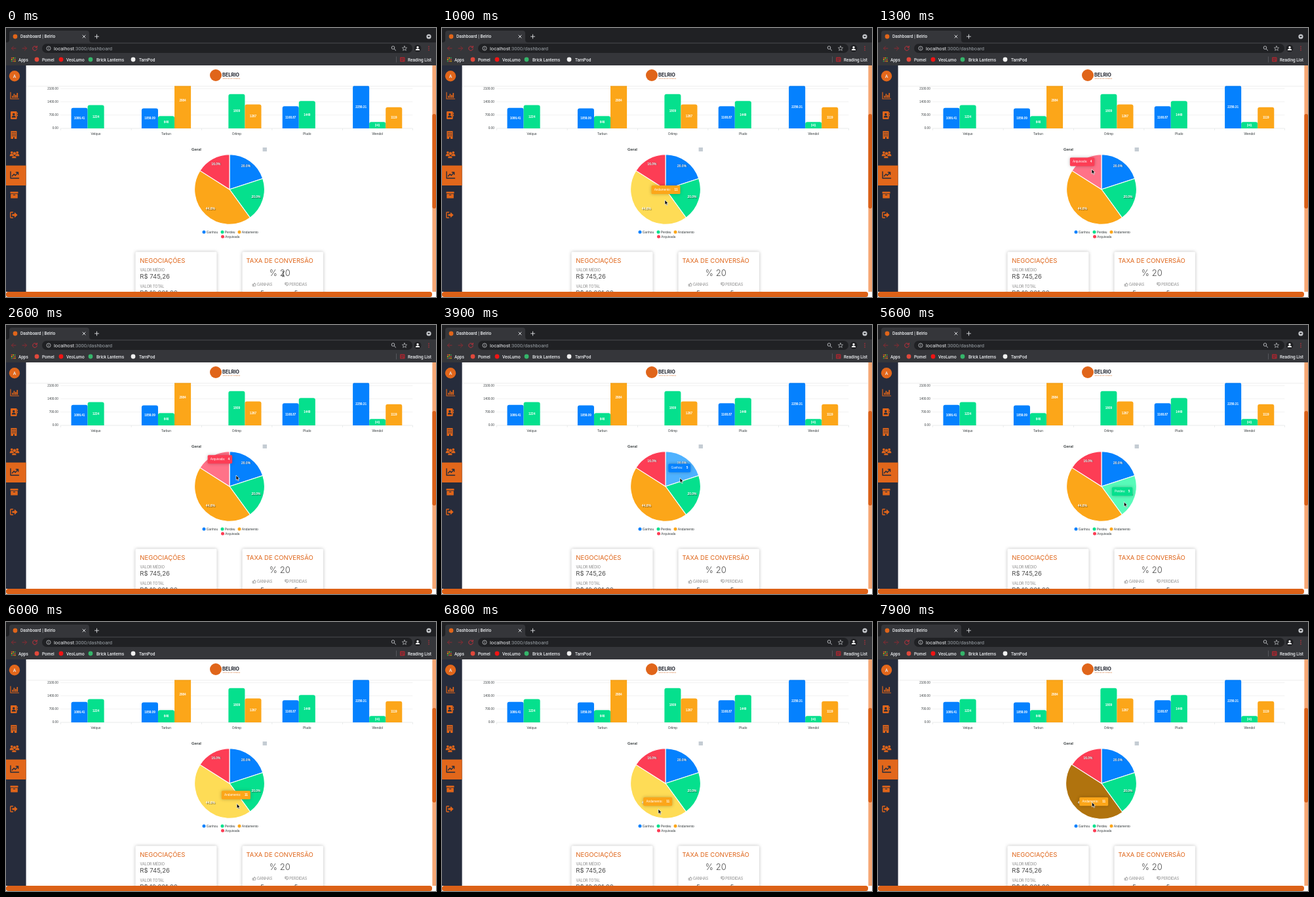
An HTML page for the animation above (8000 ms loop, 656 by 410 pixels).

```html
<!DOCTYPE html>
<html lang="pt-BR">
<head>
<meta charset="utf-8">
<title>Dashboard | Belrio</title>
<style>
  html, body { margin: 0; width: 100%; height: 100%; overflow: hidden; background: #fff; }
  svg { display: block; }
  text { white-space: pre; }
  .ui { font: 500 6.5px Roboto, sans-serif; fill: #e8eaed; }
  .chart { font: 4.9px "Liberation Sans", Arial, sans-serif; fill: #373d3f; }
  .value { font-size: 4.6px; font-weight: bold; fill: #fff; }
  .share { font-size: 4.95px; font-weight: bold; fill: #fff; text-shadow: .7px .7px .8px rgba(0,0,0,.55); }
  .card { font-family: Inter, sans-serif; fill: #4c4c4c; }
  .head { font-size: 9.5px; fill: #df6418; }
  .note { font-size: 5.5px; fill: #858585; }
  .num { font-size: 9.5px; }
  .soft { filter: drop-shadow(0 0 2.4px rgba(0,0,0,.26)); }
</style>
</head>
<body>
<svg id="stage" width="656" height="410" viewBox="0 0 656 410"></svg>
<script>
const ORANGE = '#e0651a', NAVY = '#262c3c';
const LOOP = 8000, STEP = 100;
const TOP = 57;
const PIE = { x: 341, y: 246, r: 53.4 };
const slices = [
  { name: 'Ganhou', n: 5, color: '#0581fe', light: '#4fb2ff', tip: 34 },
  { name: 'Perdeu', n: 5, color: '#05e08d', light: '#58fbb9', tip: 31.5 },
  { name: 'Andamento', n: 11, color: '#fca619', light: '#fedc56', tip: 44 },
  { name: 'Arquivada', n: 4, color: '#fd3d55', light: '#ff7288', tip: 37.5 }
];
let turn = 0;
for (const s of slices) { s.from = turn; turn += s.n / 25; s.to = turn; }

// Markup helpers
const rect = (x, y, w, h, fill, rx = 0, more = '') =>
  `<rect x="${x}" y="${y}" width="${w}" height="${h}" rx="${rx}" fill="${fill}" ${more}/>`;
const dot = (x, y, r, fill, more = '') => `<circle cx="${x}" cy="${y}" r="${r}" fill="${fill}" ${more}/>`;
const text = (x, y, str, cls, more = '') => `<text x="${x}" y="${y}" class="${cls}" ${more}>${str}</text>`;
const line = (d, color, w = 1) =>
  `<path d="${d}" fill="none" stroke="${color}" stroke-width="${w}" stroke-linecap="round" stroke-linejoin="round"/>`;
const shape = (d, fill) => `<path d="${d}" fill="${fill}"/>`;
const at = (x, y, body) => `<g transform="translate(${x} ${y})">${body}</g>`;
const MID = 'text-anchor="middle"', END = 'text-anchor="end"';

function polar(turns, r) {
  const a = turns * 2 * Math.PI;
  return [PIE.x + r * Math.sin(a), PIE.y - r * Math.cos(a)];
}
function wedge(s, r) {
  const big = s.to - s.from > .5 ? 1 : 0;
  return `M${PIE.x} ${PIE.y}L${polar(s.from, r)}A${r} ${r} 0 ${big} 1 ${polar(s.to, r)}Z`;
}

function browser() {
  const bar = '#35363a', grey = '#c4c7cb', red = '#c5303a';
  const marks = [[47, 55, 'Pomel', '#e0483b'], [84, 92, 'VeoLumo', '#f01414'],
    [129, 138, 'Brick Lanterns', '#35b56a'], [194, 203, 'TarnPod', '#f2f2f2']];
  let out = rect(0, 0, 656, TOP, '#202124') + rect(0, 22, 656, TOP - 22, bar) +
    `<path d="M1 22q4 0 4-4V8q0-4 4-4h114q4 0 4 4v10q0 4 4 4z" fill="${bar}"/>` +
    dot(14, 13, 3.4, ORANGE) + text(22, 15.2, 'Dashboard | Belrio', 'ui') +
    line('M117 11l4 4m0-4l-4 4', '#e8eaed', .9) + line('M135.5 13h6m-3-3v6', '#dfe1e5', .9) +
    dot(645, 13, 3.6, grey) + shape('M643 12h4l-2 2.6z', '#202124') +
    line('M15 31H8.5m3-3l-3 3l3 3', '#8b2a32') + line('M25 31h6.5m-3-3l3 3l-3 3', '#8b2a32') +
    line('M46.6 29a3.3 3.3 0 1 0 .7 2.6M47.3 27.5v2.2h-2.2', red) +
    rect(55, 24, 565, 14, '#202124', 7) +
    dot(65, 31, 3.1, 'none', `stroke="${grey}" stroke-width=".8"`) + line('M65 30.8v1.6M65 29.3v.1', grey, .8) +
    text(73, 33.5, 'localhost<tspan fill="#9aa0a6">:3000/dashboard</tspan>', 'ui', 'style="font-size:7.6px;font-weight:400"') +
    dot(590.5, 30, 2.3, 'none', `stroke="${grey}" stroke-width=".9"`) + line('M592.4 32l2.2 2.2', grey) +
    line('M608 27.5l1 2.4l2.6.2l-2 1.7l.7 2.5l-2.3-1.4l-2.3 1.4l.7-2.5l-2-1.7l2.6-.2z', grey, .7) +
    dot(628, 31, 5.5, '#202124') + dot(628, 29.4, 1.6, '#fff') + shape('M624.8 34q0-2.6 3.2-2.6t3.2 2.6z', '#fff');
  for (const dy of [-2.7, 0, 2.7]) out += dot(645, 31 + dy, .8, red);
  const hues = ['#e8453c', '#f5b400', '#35a853'];
  for (let i = 0; i < 9; i++)
    out += rect(7.8 + i % 3 * 2.5, 44.8 + (i / 3 | 0) * 2.5, 1.7, 1.7, hues[(i + (i / 3 | 0)) % 3], .4);
  out += text(19, 50.6, 'Apps', 'ui');
  marks.forEach(([ix, tx, label, color]) => out += dot(ix, 48, 3.4, color) + text(tx, 50.6, label, 'ui'));
  return out + rect(595, 43.5, .7, 9, '#63656a') +
    rect(601, 44.5, 7.5, 7, '#a8262f', 1) + line('M602.5 46.5h4.5m-4.5 1.6h4.5m-4.5 1.6h3', '#35363a', .7) +
    text(613, 50.6, 'Reading List', 'ui');
}

function sidebar() {
  const person = (x, y, k) => dot(x, y, 1.9 * k, ORANGE) +
    shape(`M${x - 3 * k} ${y + 5.4 * k}v-1q0-2.3 2-2.3h${2 * k}q2 0 2 2.3v1z`, ORANGE);
  let windows = '';
  for (let i = 0; i < 9; i++) windows += rect(-2.9 + i % 3 * 2.3, -4.3 + (i / 3 | 0) * 2.5, 1.2, 1.3, NAVY);
  return rect(0, TOP, 30.6, 402 - TOP, NAVY) + rect(0, 209.6, 30.6, 30.4, '#e2671b') +
    dot(13, 73.3, 8.2, '#e2671b') + text(13, 75.9, 'A', 'ui', MID + ' style="font-size:7px"') +
    at(13, 103, line('M-6-5V5H6.5', ORANGE, 1.2) +
      [[-3.8, 3], [-1.4, 6], [1, 4.4], [3.4, 7.4]].map(([x, h]) => rect(x, 3.4 - h, 1.7, h, ORANGE)).join('')) +
    at(12, 133, rect(-5, -6, 9.6, 12, ORANGE, 1.2) + rect(5, -4, 1, 2.2, ORANGE) + rect(5, -.8, 1, 2.2, ORANGE) +
      dot(-.2, -1.6, 1.7, NAVY) + shape('M-3.2 3.4q0-2.8 3-2.8t3 2.8z', NAVY)) +
    at(12, 163, rect(-4.6, -6, 9, 12, ORANGE, .6) + windows + rect(-1, 3.4, 2, 2.6, NAVY)) +
    at(13, 193, person(-4.2, -3.2, 1) + person(4.2, -3.2, 1) +
      `<g stroke="${NAVY}" stroke-width=".5">${person(0, -1.7, 1.35)}</g>`) +
    at(13, 224, line('M-6-5V5H6.5', NAVY, 1.4) + line('M-3.6 1.8L-.8-1.2L1.2.8L5-3.4M2.4-4H5.6V-.8', NAVY, 1.4)) +
    at(12.5, 254.5, rect(-6, -5, 12, 2.8, ORANGE, .5) + rect(-5.3, -1.5, 10.6, 6.5, ORANGE, .6) + rect(-1.7, -.4, 3.4, 1, NAVY, .4)) +
    at(12, 285, line('M-1.5-4.2H-4.3Q-5.2-4.2-5.2-3.3V3.3Q-5.2 4.2-4.3 4.2H-1.5', ORANGE, 1.4) +
      shape('M-2.6-1.5H1V-4.2L5.6 0L1 4.2V1.5H-2.6z', ORANGE));
}

function barChart() {
  const groups = [
    ['Velquo', 1086.41, 1234, 0], ['Tarbun', 1059.09, 646, 2984], ['Orlimp', 0, 1809, 1267],
    ['Pludo', 1168.87, 1449, 0], ['Wendol', 2259.31, 341, 1119]];
  const left = 83.4, base = 153, unit = 20.2 / 700, gap = 107.4, w = 25.06;
  let out = '';
  for (let i = 0; i < 4; i++) {
    const y = base - 20.2 * i;
    out += rect(left, y - .3, 537, .6, i ? '#e9e9e9' : '#d9dcde') +
      text(79.7, y + 1.1, (700 * i).toFixed(2), 'chart', END + ' style="font-size:4.57px"');
  }
  for (let i = 0; i < 6; i++) out += rect(left + gap * i, base, .6, 3, '#dcdfe1');
  groups.forEach(([name, ...values], g) => {
    const mid = left + gap * (g + .5);
    out += text(mid, 162.9, name, 'chart', MID);
    values.forEach((v, i) => {
      if (!v) return;
      const x = mid + (i - 1.5) * w, h = v * unit;
      out += shape(`M${x} ${base}v${3 - h}q0-3 3-3h${w - 6}q3 0 3 3V${base}z`, slices[i].color) +
        text(x + w / 2, base - h / 2 + 1.6, v, 'chart value', MID);
    });
  });
  return out;
}

function header() {
  return rect(30.6, TOP, 620, 88.3 - TOP, '#fff', 0, 'style="filter:drop-shadow(0 .8px 1.2px rgba(0,0,0,.16))"') +
    dot(320, 72, 9, ORANGE) +
    text(330, 74.2, 'BELRIO', 'card', 'style="font-size:7.3px;font-weight:700;fill:#20242e"') +
    text(330.5, 77.6, 'GESTOR DE VENDAS', 'card', 'style="font-size:2.7px;fill:#df8a55"');
}

function pie() {
  let out = text(283, 187, 'Geral', 'chart', 'style="font-size:5.8px;font-weight:bold"') +
    line('M392 183.1h5.6m-5.6 2h5.6m-5.6 2h5.6', '#6e8192', .8);
  slices.forEach((s, i) => out += `<path id="s${i}" stroke="#fff" stroke-width="1.1"/>`);
  for (const s of slices) {
    const [x, y] = polar((s.from + s.to) / 2, 42.6);
    out += text(x, y, (s.n * 4).toFixed(1) + '%', 'chart share', MID);
  }
  [[302, 311], [330, 311], [356, 311], [330.5, 318]].forEach(([x, y], i) =>
    out += dot(x, y, 2.5, slices[i].color) + text(x + 3.8, y + 1.8, slices[i].name, 'chart'));
  return out;
}

function cards() {
  const thumb = line('M-2.6-.3h1.4v3.2h-1.4zM-1.2 0L.3-2.8q1.1 0 .7 2h1.8l-.5 3.7h-3.5', '#777', .7);
  const box = (x, w) => rect(x, 341.2, w, 90, '#fff', 1.5, 'class="soft"');
  return box(197.5, 124) + box(360.5, 123.5) +
    text(204.3, 357.8, 'NEGOCIAÇÕES', 'card head') +
    text(204.5, 371, 'VALOR MÉDIO', 'card note') + text(204.3, 382.4, 'R$ 745,26', 'card num') +
    text(204.5, 396, 'VALOR TOTAL', 'card note') + text(204.3, 407, 'R$ 10.001,00', 'card num') +
    text(366.5, 357.8, 'TAXA DE CONVERSÃO', 'card head') +
    text(417.8, 378, '% 20', 'card', MID + ' style="font-size:13px;font-weight:300"') +
    at(378.7, 390.8, `<g transform="scale(.85)">${thumb}</g>`) + text(383, 393, 'GANHAS', 'card note') +
    at(428.3, 390.8, `<g transform="scale(.85 -.85)">${thumb}</g>`) + text(432.3, 393, 'PERDIDAS', 'card note') +
    text(391, 407, '5', 'card num', MID) + text(442.5, 407, '5', 'card num', MID);
}

function scrollbars() {
  return rect(650.4, TOP, 6, 410 - TOP, '#fff') + rect(650.4, TOP, 6, 402 - TOP, '#f6a774') +
    rect(650.4, 131, 5.6, 144, '#d95f17', 2.8) +
    rect(0, 402, 656, 8, '#fff') + rect(0, 402, 650, 8, '#dc6117', 3.5);
}

function overlay() {
  return `<g id="tip" class="soft"><rect id="tipBox" height="13" y="-13" rx="1.6"/>` +
    text(0, -5, '', 'chart', 'id="tipName" style="font-size:4.7px;fill:#fff"') +
    text(0, -5, '', 'chart', `id="tipNum" ${END} style="font-size:4.7px;font-weight:bold;fill:#fff"`) + '</g>' +
    `<path id="arrow" d="M0 0V7.4L1.7 5.9L2.9 8.6L4.1 8.1L2.9 5.4H5.1Z" fill="#000" stroke="#fff" stroke-width=".7"/>` +
    `<g id="beam">${line('M-1.6-4Q0-4 0-3V3Q0 4-1.6 4M1.6-4Q0-4 0-3M0 3Q0 4 1.6 4M-.9.9h1.8', '#333', .8)}</g>`;
}

const $ = id => document.getElementById(id);
$('stage').innerHTML = rect(0, 0, 656, 410, '#fff') + barChart() + header() + pie() + cards() +
  sidebar() + browser() + scrollbars() + overlay();

// Rows of time, x, y
const pointer = [
  [400, 423, 375], [1000, 340, 262], [1200, 311, 219], [1300, 326, 215], [1500, 327, 218],
  [2500, 327, 220], [2600, 351, 229], [3000, 363, 233], [3900, 363, 233], [4600, 375.3, 269.5],
  [5600, 375.3, 269.5], [6400, 329, 284], [6600, 330, 285], [7500, 330, 285], [7700, 326.3, 274.5]];
const tipPath = [
  [900, 352, 268], [1200, 311.6, 210.4], [1300, 311.6, 210.4], [1400, 326.4, 211.2], [2600, 326.4, 211.2],
  [2700, 350, 220], [3000, 362.3, 224.4], [3900, 362.3, 224.4], [4600, 372.6, 260.3], [5600, 372.6, 260.3],
  [6400, 329.2, 280.2]];

function follow(rows, t) {
  const next = rows.findIndex(r => r[0] > t);
  if (next < 1) return rows[next ? rows.length - 1 : 0].slice(1);
  const [t0, x0, y0] = rows[next - 1], [t1, x1, y1] = rows[next];
  const p = (t - t0) / (t1 - t0), k = p * p * (3 - 2 * p);
  return [x0 + (x1 - x0) * k, y0 + (y1 - y0) * k];
}

function sliceAt([x, y]) {
  const dx = x - PIE.x, dy = y - PIE.y;
  if (Math.hypot(dx, dy) > PIE.r) return -1;
  const a = (Math.atan2(dx, -dy) / (2 * Math.PI) + 1) % 1;
  return slices.findIndex(s => a < s.to);
}

function move(id, [x, y], shown) {
  $(id).setAttribute('transform', `translate(${x} ${y})`);
  $(id).setAttribute('visibility', shown ? 'visible' : 'hidden');
}

function draw(t) {
  const spot = follow(pointer, t);
  const hover = sliceAt(follow(pointer, t - STEP)); // the page reacts one step late
  const pressed = t >= 7700;
  slices.forEach((s, i) => {
    const on = i === hover;
    $('s' + i).setAttribute('d', wedge(s, PIE.r + (on && pressed ? 1 : 0)));
    $('s' + i).setAttribute('fill', on ? (pressed ? '#b0730e' : s.light) : s.color);
  });
  if (hover >= 0) {
    const s = slices[hover], half = s.tip / 2;
    $('tipBox').setAttribute('x', -half);
    $('tipBox').setAttribute('width', s.tip);
    $('tipBox').setAttribute('fill', s.color);
    $('tipName').setAttribute('x', 4.2 - half);
    $('tipName').textContent = s.name + ':';
    $('tipNum').setAttribute('x', half - 4);
    $('tipNum').textContent = s.n;
  }
  move('tip', follow(tipPath, t), hover >= 0);
  move('arrow', spot, t >= 500);
  move('beam', spot, t < 500);
}

const start = performance.now();
function tick() {
  const t = (performance.now() - start) % LOOP;
  draw(Math.floor(t / STEP) * STEP);
  requestAnimationFrame(tick);
}
tick();
</script>
</body>
</html>
```
